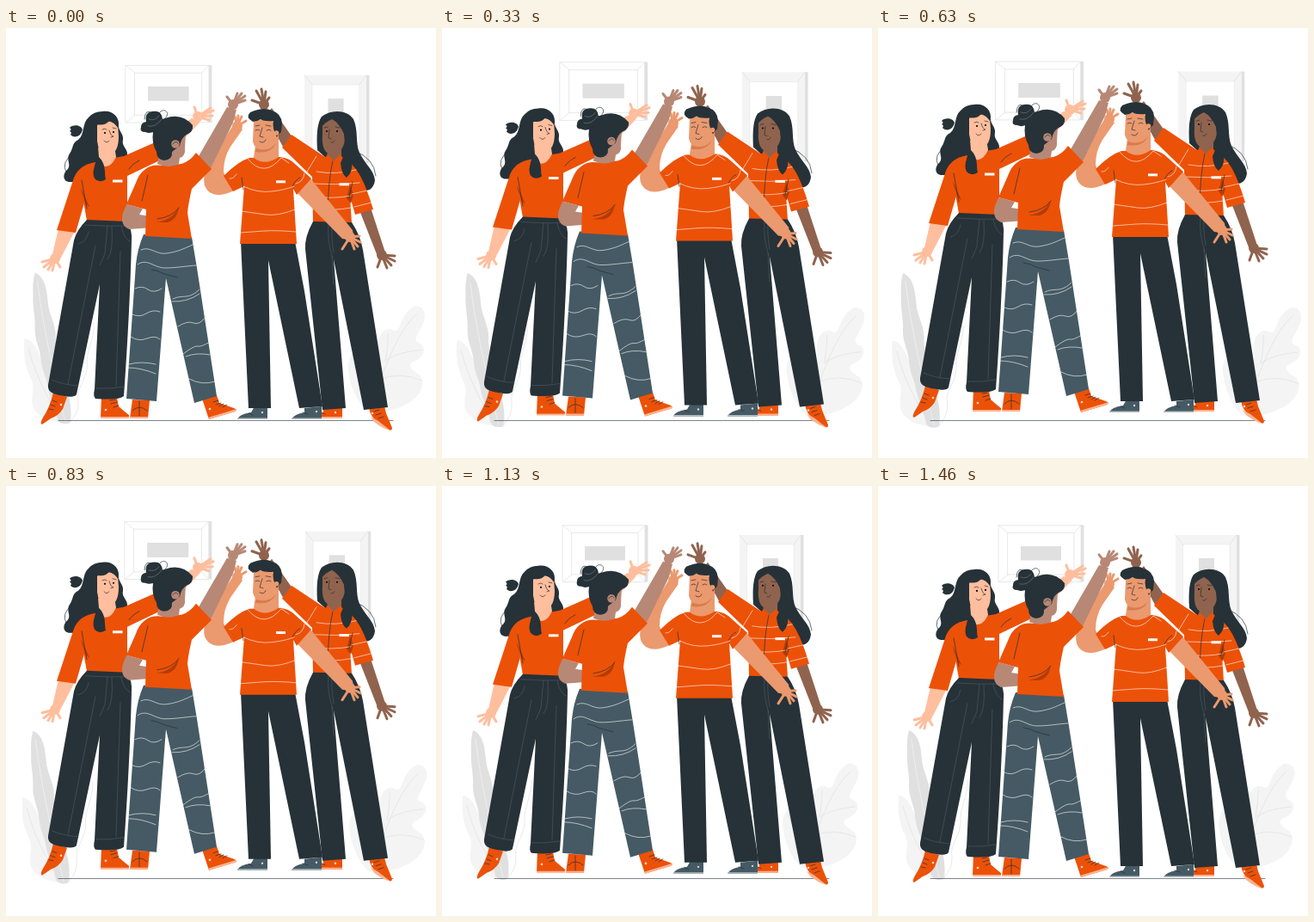
Animation of 500x500 px, one loop 1500 ms. Source, as an HTML page:

```html
<!DOCTYPE html>
<html lang="en">
<head>
<meta charset="utf-8">
<title>High five</title>
<style>
html, body { margin: 0; width: 100%; height: 100%; overflow: hidden; background: #fff; }
svg { display: block; width: 100vw; height: 100vh; }
path, line { stroke-linecap: round; stroke-linejoin: round; }
.o { fill: #ec5108; }
.d { fill: #263238; }
.g { fill: #455a64; }
.l { fill: none; stroke: #263238; stroke-width: .7; }
.w { fill: none; stroke: #fff; stroke-width: .6; }
.p { fill: none; stroke: #56656c; stroke-width: .5; }
.e { fill: none; stroke: #e0e0e0; stroke-width: .7; }
.sh { fill: #b43c05; }
.s1 { fill: #ffbe9d; stroke: #ffbe9d; }
.s2 { fill: #b78876; stroke: #b78876; }
.s3 { fill: #eb996e; stroke: #eb996e; }
.s4 { fill: #90634e; stroke: #90634e; }
.s1, .s2, .s3, .s4 { stroke-width: 0; }
</style>
</head>
<body>
<svg viewBox="0 0 500 500" preserveAspectRatio="xMidYMid meet">
<g id="back">
  <!-- wall frames -->
  <path fill="#e0e0e0" d="M236 45.500h3.500v66H236z"/>
  <path fill="#fff" stroke="#e0e0e0" stroke-width=".7" d="M140.500 45.800H236V111.500H140.500z"/>
  <path class="e" stroke-width=".5" d="M151 54.500H228V103H151zM140.500 45.800l10.500 8.700M236 45.800l-8 8.700M140.500 111.500l10.500-8.500M236 111.500l-8-8.500"/>
  <path fill="#e0e0e0" d="M166 70h47v16.500h-47z"/>
  <path fill="#e0e0e0" d="M417 57h3.500v101H417z"/>
  <path fill="#f4f4f4" d="M346 57h71v101h-71z"/>
  <path fill="#fff" stroke="#e8e8e8" stroke-width=".6" d="M355 68h54v78h-54z"/>
  <path class="e" stroke-width=".5" d="M346 57l9 11M417 57l-8 11M346 158l9-12M417 158l-8-12"/>
  <path fill="#e0e0e0" d="M373 84h18v47h-18z"/>
  <!-- plants -->
  <path fill="#f4f4f4" d="M24 360C31 360 36 367 40 376C45 389 53 389 54 403C55 415 65 425 74 438Q81 452 77 457C56 458 35 449 33 435C32 423 36 417 32 407C24 393 23 377 24 360z"/>
  <path fill="#e0e0e0" d="M36 284C47 288 50 303 51 318C52 332 60 343 60 357C59 369 63 378 65 394C69 410 82 434 76 457Q66 460 62 453C60 440 54 430 51 416C50 405 44 398 43 384C42 370 36 363 36 349C37 336 33 323 34 310Q33 295 36 284z"/>
  <path fill="none" stroke="#f4f4f4" stroke-width=".7" d="M39 294C45 345 57 398 71 455"/>
  <path class="e" d="M29 372C37 403 51 430 69 457M104 342C105 360 94 376 96 391C96 407 83 417 86 431Q87 445 76 456"/>
  <path fill="#f4f4f4" d="M472 323C482 321 487 330 483 341C477 355 468 362 480 366C487 372 482 382 472 386C462 391 470 396 479 402C486 412 479 427 464 435C449 443 434 446 419 444C405 433 397 411 396 391C398 371 413 371 421 383C429 393 432 386 430 371C430 355 439 345 448 350C455 354 455 344 460 335Q465 327 472 323z"/>
  <path class="e" d="M475 332C453 351 440 389 421 440M441 384Q455 375 480 373M432 407Q455 397 481 408M439 386Q442 368 442 354M426 420Q410 402 402 382"/>
</g>
<line x1="61" y1="456.500" x2="450" y2="456.500" stroke="#263238" stroke-width=".6"/>
<g id="crew">
  <!-- woman, far left -->
  <g>
    <path class="d" d="M112 97C123 95 132 103 131 114C131 120 137 123 136 130C134 138 142 140 141 148Q139 152 132 151L128 174L108 177C102 173 99 166 101 160C96 169 89 180 76 179C65 180 66 169 71 165C77 159 69 153 74 146C79 139 76 134 84 130C92 123 88 111 96 104Q102 97 112 97z"/>
    <path class="d" d="M88 121C86 127 78 128 75 124Q77 121 74 120Q77 118 74 116C77 112 87 112 89 118z"/>
    <path class="l" d="M104 101C119 93 132 101 130 112M77 147Q64 156 70 168"/>
    <path class="o" d="M104 156Q123 151 137 149L180 130L187 150L141 172L141 226L94 224L88 190Q84 166 104 156z"/>
    <path class="s1" d="M107 139L106 154Q118 170 128 150L126 137z"/>
    <path class="s1" d="M106 113Q118 104 130 113L131 126C131 139 127 146 121 147Q108 147 106 133z"/>
    <path class="d" d="M106 112Q115 114 120 108Q126 110 130 116Q131 102 119 99Q104 98 104 118L107 138L108 150C117 159 114 168 116 176Q108 181 103 175C98 163 109 156 100 145L96 120z"/>
    <path class="l" d="M112 118Q115 116 117 118M124 116l4 1M120 119Q122 126 125 126l-3 1M114 131Q117 135 120 131"/>
    <circle cx="115" cy="122" r="1.100"/><circle cx="125" cy="121" r="1.100"/>
    <path class="s1" d="M61 233L80 236L65 265L61 272L53 268z"/>
    <g data-hand="s1 57 268 42 272 44 278 49 281 54 282 63 278"/>
    <path class="o" d="M104 156Q85 159 79 174L59 235L81 238L94 193z"/>
    <path class="sh" d="M87 186L97 208L93 205L88 191z"/>
    <path class="l" d="M88 177L94 210M143 164Q147 158 155 154"/>
    <path class="s1" d="M178 131L216 105L226 109L187 150z"/>
    <g data-hand="s1 223 103 238 93 241 96 240 102 236 107 219 92"/>
    <path fill="#fff" d="M124 176.500h11.500v3H124z"/>
    <path class="o" d="M55 424L71 429L66 443Q61 451 52 454Q45 459 42 461Q39 460 43 453Q51 441 55 424zM111 428L129 430L131 440Q139 447 143 450V453.500H110z"/>
    <path fill="#fbb391" d="M110 452h33v2h-33z"/>
    <path class="l" d="M54 433l5 2M52 438l5 2M50 443l5 1M121 433l6-1M122 437l7-2M125 441l6-2"/>
    <circle cx="64" cy="438" r="1.300" fill="#ffd9c7"/><circle cx="116" cy="444" r="1.300" fill="#ffd9c7"/>
    <path class="d" d="M94 223L141 225Q147 236 146 247Q144 330 137 428Q132 433 104 431Q101 428 103 420L109 298L82 426Q79 432 55 425Q48 422 49 415L79 247Q82 235 94 223z"/>
    <path class="p" d="M92 229Q118 231 143 230M118 230L115 262Q112 270 109 276M123 231Q125 261 118 269M84 251Q94 249 96 237M134 231Q137 246 146 249M104 253L72 414M133 260L128 416M53 409Q66 415 84 416M104 419Q121 420 137 417"/>
  </g>
  <!-- woman, far right -->
  <g>
    <path class="d" d="M367 103C378 94 397 95 404 106C410 119 406 133 411 145C417 158 428 165 429 177Q427 190 416 189L390 167L362 142Q360 113 367 103z"/>
    <path class="l" d="M405 143Q428 151 430 172"/>
    <path class="s4" d="M322 138L302 101L309 93L333 127z"/>
    <g data-hand="s4 300 89 286 84 291 73 297 71 302 74 306 81"/>
    <path class="s4" d="M411 212L424 209L441 261L433 268z"/>
    <g data-hand="s4 437 264 432 278 443 279 448 276 452 271 452 265"/>
    <path class="o" d="M371 150L332 124L321 139L356 173L357 226L402 227L400 196L406 217L427 211Q420 187 412 172Q404 157 389 149z"/>
    <path class="sh" d="M400 182L404 194L401 204L396 198z"/>
    <path class="w" d="M350 167L361 149M361 167Q383 171 407 165M357 181Q383 183 411 180M357 196Q380 199 401 195M357 210Q380 213 401 209M402 193L420 189M405 208L425 203"/>
    <path class="l" d="M380 154Q374 180 374 223M403 179L399 197"/>
    <path class="s4" d="M375 137L373 150L380 155L390 149V134z"/>
    <path class="s4" d="M368 112Q378 101 392 109L394 130C393 140 387 146 380 147C370 147 367 137 368 124z"/>
    <path class="o" d="M374 147L380 153L374 158L371 151zM389 147L381 154L388 159L392 152z"/>
    <path class="d" d="M367 115Q372 109 379 106Q387 110 393 123L395 143L389 157Q390 170 396 174Q404 167 402 154Q407 143 404 118C401 103 378 96 368 106L363 138Q367 137 367 130z"/>
    <path class="l" d="M370 116l4-1M383 115l5 1M376 118L375 128l3 1M378 133Q381 134 382 131"/>
    <circle cx="373" cy="120" r="1"/><circle cx="385" cy="120" r="1"/>
    <path fill="#fff" d="M387.500 180.300H399v3h-11.500z"/>
    <path class="o" d="M369 442H391V454H353Q358 448 369 447zM422 441L440 440L442 448L449 465Q449 469 445 467L432 458Q424 453 422 441z"/>
    <path fill="#fbb391" d="M353 452h38v2h-38zM424 452L433 457L447 468Q438 466 428 458z"/>
    <path class="l" d="M428 446l6-2M430 450l6-2M433 454l6-2M365 446l6 3"/>
    <circle cx="383" cy="447" r="1.200" fill="#ffd9c7"/><circle cx="426" cy="448" r="1.200" fill="#ffd9c7"/>
    <path class="d" d="M357 225L402 226Q412 241 415 258L444 441L416 444L381 269L395 442L368 444L348 257Q347 243 357 225z"/>
    <path class="p" d="M375 229Q373 246 380 268M379 229Q378 243 381 261M379 265L381 298"/>
  </g>
  <!-- man -->
  <g>
    <path class="s3" d="M256 176L253 167Q253 151 261 138L275 118L266 110L235 159Q228 174 231 183C235 194 247 198 265 189z"/>
    <g data-hand="s3 269 114 266 103 270 102 274 103 279 108"/>
    <path class="g" d="M289 440H304V455H269Q271 449 285 447zM347 442L367 440V455H332Q335 449 347 447z"/>
    <path fill="#b7c0c4" d="M269 453.500h35v1.500h-35zM332 453.500h35v1.500h-35z"/>
    <path class="l" d="M282 448l5 2M345 447l6 2"/>
    <circle cx="298" cy="447" r="1.200" fill="#cfd6d9"/><circle cx="361" cy="446" r="1.200" fill="#cfd6d9"/>
    <path class="d" d="M273 248H336L347 306L368 440L341 442L305 270L308 442L282 442z"/>
    <path class="s3" d="M350 170L403 235L405 247L391 245L337 190z"/>
    <g data-hand="s3 400 243 391 257 405 257 409 254 412 249 411 242"/>
    <path class="o" d="M283 151L319 150Q329 151 336 158L355 175L338 194L334 187L338 251L272 251L277 184L264 190L253 172Q270 155 283 151z"/>
    <path class="l" d="M274 174L276 188M333 184Q337 176 342 174" stroke-width=".6"/>
    <path class="s3" d="M290 136L288 151Q301 161 317 150L317 122z"/>
    <path fill="#d87b4d" d="M291 140Q305 145 314 134Q308 147 290 144z"/>
    <path class="s3" d="M288 109Q304 101 318 111L317 122Q315 138 303 141Q289 143 287 132z"/>
    <path class="d" d="M287 109Q278 104 284 98Q300 91 309 96Q320 99 321 111L320 121Q317 123 315 127Q309 116 311 108Q300 109 296 106Q292 109 287 109z"/>
    <circle class="s3" cx="314.500" cy="122" r="2.800"/>
    <path class="l" d="M290 114l5-1M302 113l6 1M290 119q3-2 5 0M303 119q3-2 5 0M298 116L295 126l4 1M295 132Q300 135 302 130M282 104Q289 99 297 101"/>
    <path class="w" stroke="#ffd0b8" d="M281 152Q300 175 320 151L329 157M276 184Q292 192 309 190T335 184M274 213Q288 215 302 217T336 211M273 238Q286 237 300 236T337 237M260 175Q264 176 268 170M337 181Q346 179 347 169"/>
    <path fill="#fff" d="M314 177.300h11v3h-11z"/>
  </g>
  <!-- woman seen from behind -->
  <g>
    <path class="s2" d="M140 205L159 210L155 217L168 219L170 232L143 234Q132 229 136 215z"/>
    <path class="s2" d="M224 149L257 92L268 95L264 110L237 165z"/>
    <g data-hand="s2 264 89 257 80 269 76 274 76 278 79 278 84"/>
    <path class="o" d="M147 432L167 433L165 454H144zM228 431L245 427L248 436L265 442Q270 444 266 446L236 455z"/>
    <path fill="#fbb391" d="M144 452h21v2h-21zM235 453L268 443L267 446L236 455z"/>
    <path class="l" d="M155 434V451M147 445Q155 437 164 445M241 435l6-2M244 438l6-2M248 440l5-3M252 441l5-3"/>
    <circle cx="237" cy="443" r="1.300" fill="#ffd9c7"/>
    <path class="g" d="M160 240L216 243L222 279L245 428L219 436L186 291L175 434L140 431L151 275Q153 256 160 240z"/>
    <path class="l" d="M169 281Q177 282 184 286L199 290"/>
    <path class="w" d="M157 258C168 253 174 264 187 262S206 257 217 252M153 275C164 267 172 279 185 279S207 277 221 276M150 303Q158 299 165 304T181 303M194 315C207 309 211 317 225 304M193 318Q211 319 225 309M147 333Q155 337 163 332T179 330M200 347Q211 340 218 343T232 336M145 359Q154 365 164 361T179 362M206 379Q219 369 223 370T237 365M209 382Q221 377 237 380M143 391Q158 387 174 391M142 395Q157 395 174 402M213 408Q228 416 243 411"/>
    <path class="o" d="M161 165Q169 158 182 160L204 158Q214 155 221 145L239 164L216 187Q212 204 211 215L216 245L162 242L163 211L140 205L151 180Q155 169 161 165z"/>
    <path class="sh" d="M175 226Q194 223 201 208Q199 223 188 226z"/>
    <path class="l" d="M165 171L158 201M176 222Q193 220 201 209" stroke-width=".7"/>
    <path class="s2" d="M178 146L176 158Q189 164 201 158L202 151Q209 149 208 140L209 123L195 122z"/>
    <path class="d" d="M171 121Q170 108 185 105Q204 98 217 113Q218 121 210 124Q204 127 202 137L193 144Q194 153 184 154Q175 153 175 144Q169 134 171 121z"/>
    <path class="d" d="M162 121Q155 121 157 115Q157 110 163 109Q161 98 170 97Q181 95 182 106Q184 116 176 119Q168 124 162 121z"/>
    <path class="l" d="M178 99C184 91 192 99 185 105M170 99Q162 93 161 106"/>
    <path d="M166 106Q173 109 178 102M165 114Q174 116 181 106" fill="none" stroke="#75838a" stroke-width=".6"/>
    <circle class="s2" cx="197" cy="135" r="4.800"/>
    <path class="l" d="M194 135Q197 130 200 134" stroke-width=".6"/>
  </g>
</g>
</svg>
<script>
const NS = "http://www.w3.org/2000/svg";
const LOOP = 1500, LIFT = 8.5, SWELL = 0.092;
const back = document.getElementById("back");
const crew = document.getElementById("crew");

// Data: skin class, palm centre, then fingertip points.
for (const el of document.querySelectorAll("[data-hand]")) {
  const [skin, ...n] = el.dataset.hand.split(" ");
  const [x, y, ...tips] = n.map(Number);
  const add = (name, attrs) => {
    const part = document.createElementNS(NS, name);
    for (const k in attrs) part.setAttribute(k, attrs[k]);
    el.appendChild(part);
  };
  add("circle", { cx: x, cy: y, r: 6, class: skin });
  for (let i = 0; i < tips.length; i += 2)
    add("line", { x1: x, y1: y, x2: tips[i], y2: tips[i + 1], class: skin, style: "stroke-width:3px" });
}

// Linear rise from a to b, then linear fall to c.
function beat(t, a, b, c) {
  if (t <= a || t >= c) return 0;
  return t < b ? (t - a) / (b - a) : (c - t) / (c - b);
}

function draw(ms) {
  const t = ms % LOOP;
  const pulse = beat(t, -17, 128, 428) + beat(t, 580, 722, 865) + beat(t, LOOP - 17, LOOP + 128, LOOP + 428);
  const s = 1 + SWELL * pulse;
  const y = -LIFT * (1 - Math.cos(2 * Math.PI * t / LOOP)) / 2;
  back.setAttribute("transform", `translate(250 250) scale(${s}) translate(-250 -250)`);
  crew.setAttribute("transform", `translate(0 ${y})`);
}

const start = performance.now();
function tick() {
  draw(performance.now() - start);
  requestAnimationFrame(tick);
}
draw(0);
requestAnimationFrame(tick);
</script>
</body>
</html>
```
